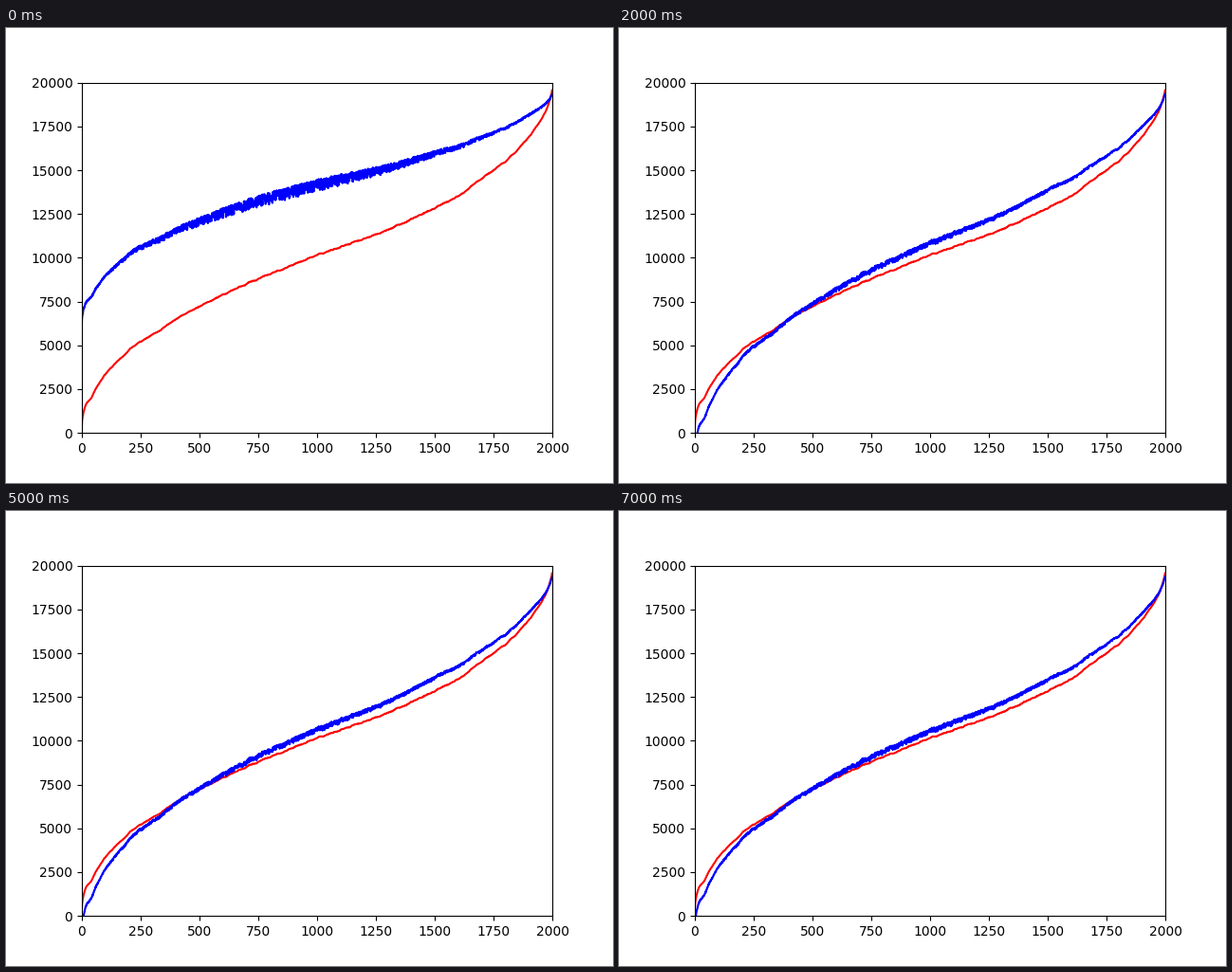
These frames come from a looping animation (640 px wide and 480 px high, 8000 ms). A matplotlib script:

```python
import numpy as np
import matplotlib.pyplot as plt
from matplotlib.animation import FuncAnimation

N = 2000
TOP = 20000
FRAMES = 8
x = np.arange(N)
rng = np.random.default_rng(7)


def arc(rank):
    """Warp ranks so that a sorted curve with steep ends becomes almost straight."""
    return np.arcsin(np.sqrt(np.asarray(rank) / N)) * 2 / np.pi


# Truth: sorted values through a few key points, with a slight random drift
RANKS = [0, 20, 40, 100, 240, 330, 400, 600, 750, 1000, 1300, 1500, 1600, 1700, 1800, 1900, 1990, N]
VALUES = [350, 1700, 2020, 3350, 5150, 5830, 6500, 7900, 8800, 10150,
          11580, 12850, 13500, 14550, 15500, 16900, 19050, 19800]
drift = np.cumsum(rng.normal(0, 7, N))
drift -= np.convolve(np.pad(drift, 40, mode="edge"), np.ones(81) / 81, "valid")
truth = np.interp(arc(x), arc(RANKS), VALUES) + drift
level = truth / TOP


def gap(*keys):
    """Prediction error as a function of the true value."""
    return np.interp(level, [0, 0.08, 0.25, 0.45, 0.65, 0.85, 1], keys)


first = gap(6000, 5800, 5420, 4350, 3040, 1200, -500)
second = gap(-1800, -400, 420, 1190, 1400, 780, -420)
settled = gap(-2000, -1280, -370, 400, 900, 480, -350)
final = gap(-1150, -880, -290, 280, 640, 350, -300)
bump = 130 * np.clip(np.sin(np.pi * (level - 0.2) / 0.8), 0, 1)

# Scatter is widest in the middle, with a dense upper edge
spread = np.sin(np.pi * (x / N) ** 0.85) ** 2
scatter = 0.5 - rng.random(N) ** 1.5


def prediction(step):
    width = 200 * spread + 80
    if step == 0:
        error, width = first, 580 * spread + 100
    elif step == 1:
        error = second
    elif step == 2:
        error = settled + bump
    else:
        error = settled + (final - settled) * (step - 3) / (FRAMES - 4)
    return truth + error + width * scatter


fig, ax = plt.subplots(figsize=(6.4, 4.8), dpi=100)
ax.set_xlim(0, N)
ax.set_ylim(0, TOP)
ax.plot(x, truth, color="red")
line, = ax.plot(x, prediction(0), color="blue")


def update(step):
    line.set_ydata(prediction(step))
    return line,


anim = FuncAnimation(fig, update, frames=FRAMES, interval=1000, repeat=True, repeat_delay=0)
plt.show()
```
